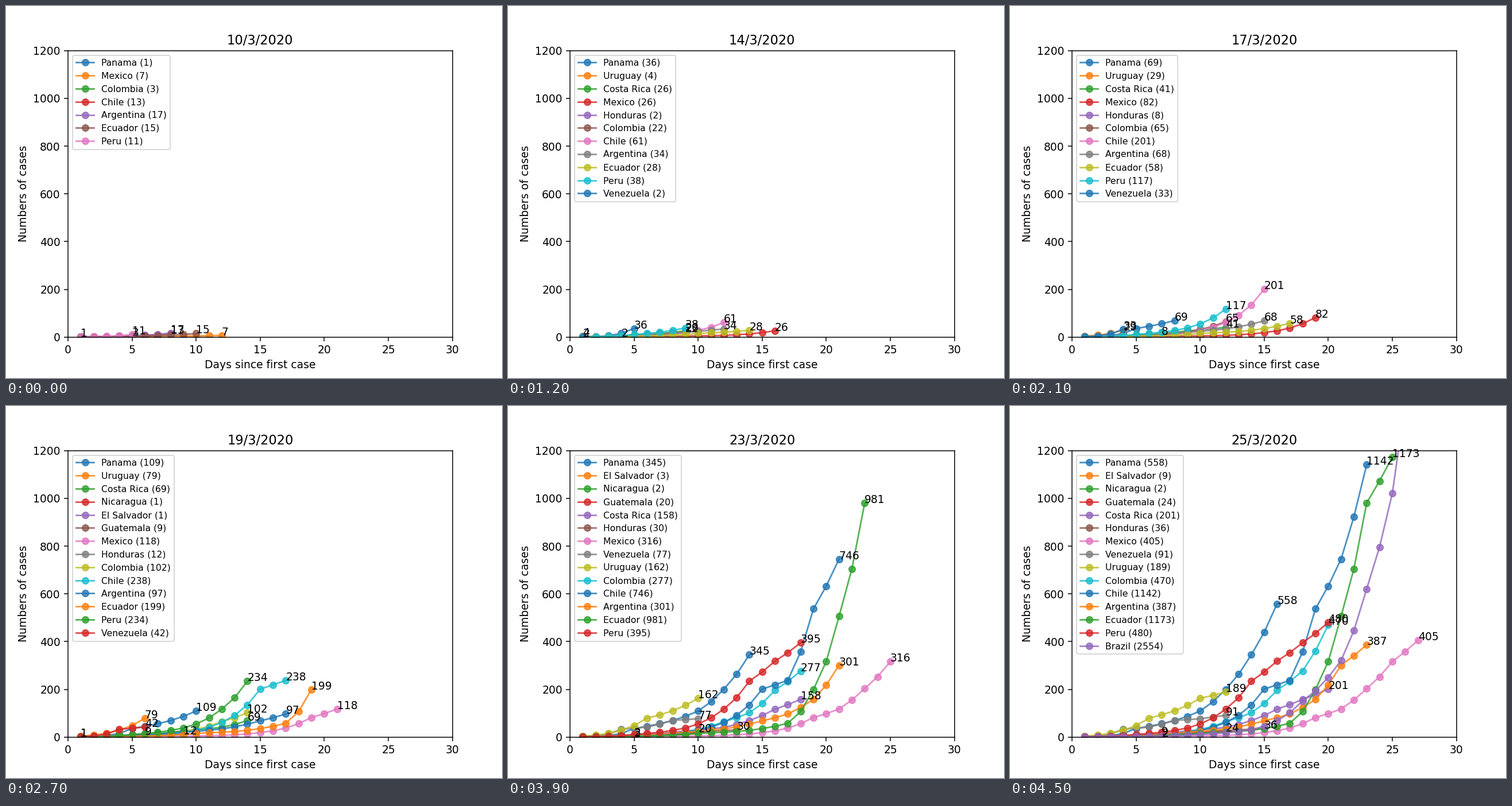
A matplotlib script for the animation above (4800 ms loop, 864x648 px).

```python
import matplotlib.pyplot as plt
import numpy as np
from matplotlib.animation import FuncAnimation

STEPS = 16
FIRST_DAY, LAST_DAY = 10, 25
KEY_DAYS = (10, 14, 17, 19, 21, 23, 25)

# Day of the first case (in March), then totals on the latest key days.
CASES = {
    "Panama": (10, (1, 36, 69, 109, 200, 345, 558)),
    "El Salvador": (19, (1, 3, 3, 9)),
    "Nicaragua": (19, (1, 2, 2, 2)),
    "Guatemala": (14, (1, 6, 9, 17, 20, 24)),
    "Costa Rica": (6, (9, 26, 41, 69, 117, 158, 201)),
    "Honduras": (11, (2, 8, 12, 24, 30, 36)),
    "Mexico": (-1, (7, 26, 82, 118, 203, 316, 405)),
    "Venezuela": (14, (2, 33, 42, 70, 77, 91)),
    "Uruguay": (14, (4, 29, 79, 110, 162, 189)),
    "Colombia": (6, (3, 22, 65, 102, 196, 277, 470)),
    "Chile": (3, (13, 61, 201, 238, 537, 746, 1142)),
    "Argentina": (3, (17, 34, 68, 97, 158, 301, 387)),
    "Ecuador": (1, (15, 28, 58, 199, 506, 981, 1173)),
    "Peru": (6, (11, 38, 117, 234, 318, 395, 480)),
    "Brazil": (-3, (31, 151, 321, 621, 1021, 1924, 2554)),
}

ANDES = ["Colombia", "Chile", "Argentina", "Ecuador", "Peru"]
ALL = list(CASES)

# First step at which each line-up of countries is used.
LINEUPS = [
    (0, ["Panama", "Mexico"] + ANDES),
    (1, ["Panama", "Costa Rica", "Mexico", "Honduras"] + ANDES),
    (4, ["Panama", "Uruguay", "Costa Rica", "Mexico", "Honduras"] + ANDES
     + ["Venezuela"]),
    (8, ["Panama", "Uruguay", "Costa Rica", "Nicaragua", "El Salvador",
         "Guatemala", "Mexico", "Honduras"] + ANDES + ["Venezuela"]),
    (10, ALL[:-1]),
    (15, ALL),
]


def growth(first, totals):
    """Daily totals: exponential growth from one key day to the next."""
    days = KEY_DAYS[-len(totals):]
    if first < days[0]:
        days, totals = (first, *days), (1, *totals)
    span = np.arange(first, LAST_DAY + 1)
    return np.rint(np.exp(np.interp(span, days, np.log(totals)))).astype(int)


def lineup(step):
    return [names for start, names in LINEUPS if start <= step][-1]


curves = {name: growth(*row) for name, row in CASES.items()}
fig, ax = plt.subplots(figsize=(6.4, 4.8), dpi=135)


def draw(step):
    ax.clear()
    # The 18 March chart already carries the next day's totals.
    today = FIRST_DAY + (9 if step == 8 else step)
    for name in lineup(step):
        count = today - CASES[name][0] + 1
        values = curves[name][:count]
        last = values[-1]
        ax.plot(range(1, count + 1), values, "-o", alpha=0.8,
                label=f"{name} ({last})")
        ax.annotate(str(last), (count, last))
    ax.set(xlim=(0, 30), ylim=(0, 1200), xlabel="Days since first case",
           ylabel="Numbers of cases", title=f"{FIRST_DAY + step}/3/2020")
    ax.legend(loc="upper left", fontsize="small")


anim = FuncAnimation(fig, draw, frames=STEPS, interval=300, repeat=True,
                     repeat_delay=0)
plt.show()
```
